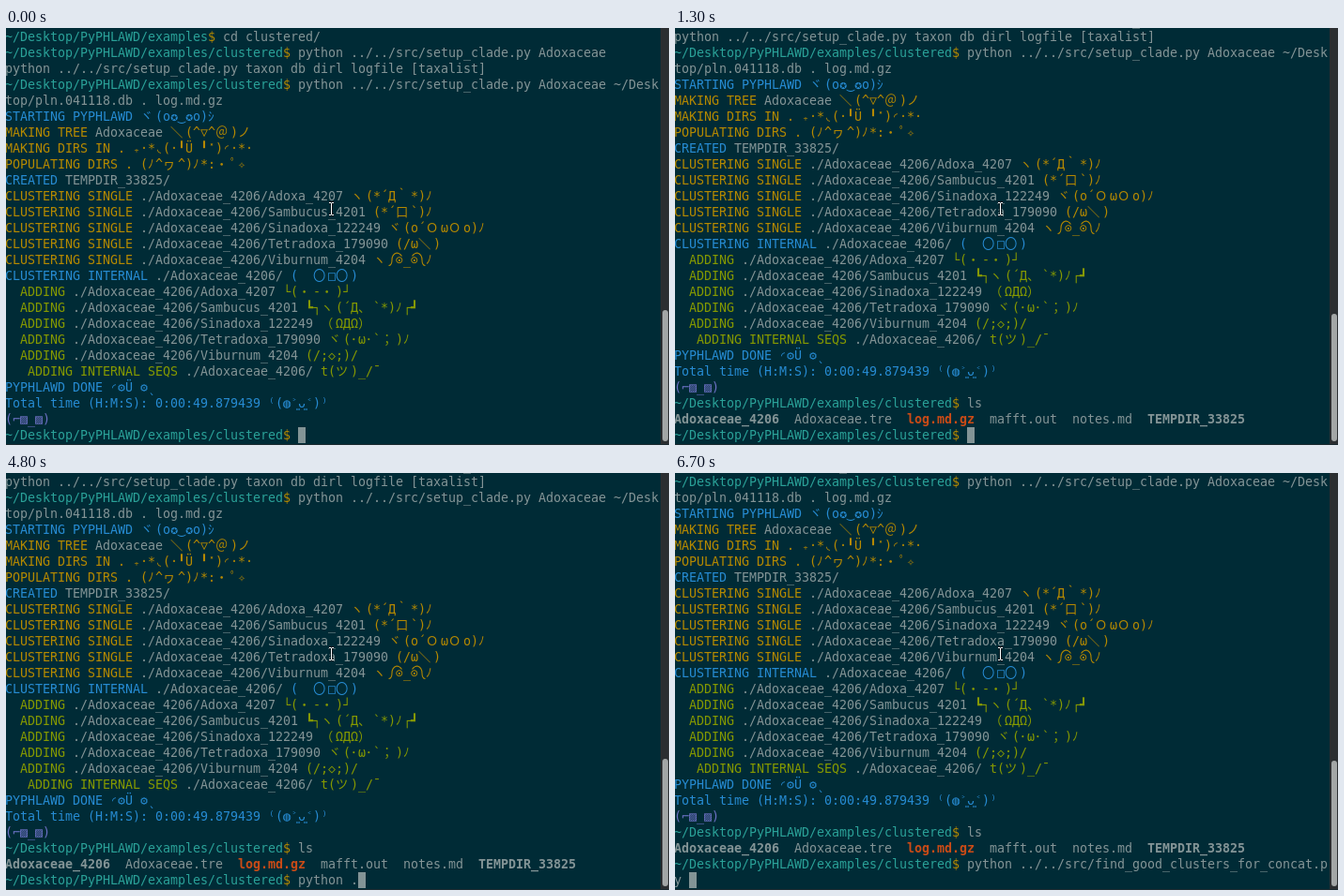
An HTML page that plays this animation: 706 px wide and 445 px high, repeating every 8 s.

```html
<!DOCTYPE html>
<html lang="en">
<head>
<meta charset="utf-8">
<title>Terminal session</title>
<style>
html, body { margin: 0; width: 100%; height: 100%; overflow: hidden; background: #002b36; }
svg { display: block; }
text {
  font: 13.333px "DejaVu Sans Mono", "Noto Sans Mono", "DejaVu Sans", "Noto Sans CJK JP", monospace;
  white-space: pre;
  fill: #839496;
}
.cyan { fill: #2aa198; }
.blue { fill: #268bd2; }
.yellow { fill: #b58900; }
.green { fill: #859900; }
.violet { fill: #6c71c4; }
.bold { font-weight: bold; }
.zip { font-weight: bold; fill: #cb4b16; }
</style>
</head>
<body>
<svg width="706" height="445" viewBox="0 0 706 445">
  <rect width="706" height="445" fill="#002b36"/>
  <g id="screen">
    <g id="log"></g>
    <g id="after"></g>
    <g fill="none" stroke="#b58900" stroke-width="1.1">
      <path id="curl" d="M407.5 253.5q3.5 0 3.5-6t5-7.5q3 0 5.5 3.5"/>
      <use href="#curl" transform="translate(854 0) scale(-1 1)"/>
    </g>
    <rect id="cursor" width="8" height="17" fill="#839496"/>
    <g id="typed"></g>
  </g>
  <rect x="697" width="9" height="445" fill="#2b2e31"/>
  <rect y="444" width="706" height="1" fill="#1b2a30"/>
  <rect id="thumb" x="699" width="6" rx="3" fill="#a3a6a6"/>
  <g fill="none">
    <path d="M344 186.5h2l.5 1 .5-1h2M346.5 187v12M344 199.5h2l.5-1 .5 1h2" stroke="#001318" stroke-width="2.6"/>
    <path d="M344 186.5h2l.5 1 .5-1h2M346.5 187v12M344 199.5h2l.5-1 .5 1h2" stroke="#fff"/>
  </g>
</svg>
<script>
const NS = "http://www.w3.org/2000/svg";
const COLS = 87, CELL = 8, ROW = 17, LOOP = 8000;
const $ = id => document.getElementById(id);

const cellX = n => n % COLS * CELL - 1;
const cellY = (row, n) => (row + Math.floor(n / COLS)) * ROW + 1;

function cellsOf(ch) {
  const c = ch.codePointAt(0);
  if (c >= 0x300 && c < 0x370) return 0;
  return (c >= 0x3000 && c < 0xa000) || (c > 0xff00 && c < 0xff61) ? 2 : 1;
}

// Lays text on the cell grid; {name} switches the style, long lines wrap.
function put(parent, row, str, start = 0) {
  const text = document.createElementNS(NS, "text");
  let n = start, style = "";
  str.split(/\{(\w+)\}/).forEach((part, i) => {
    if (i % 2) { style = part; return; }
    if (!part) return;
    const span = document.createElementNS(NS, "tspan");
    const xs = [], ys = [];
    for (const ch of part) {
      const w = cellsOf(ch), at = w ? n : n - 1;
      xs.push(cellX(at));
      ys.push(cellY(row, at) + 13);
      n += w;
    }
    span.setAttribute("x", xs.join(" "));
    span.setAttribute("y", ys.join(" "));
    span.setAttribute("class", style);
    span.textContent = part;
    text.appendChild(span);
  });
  parent.appendChild(text);
}

const home = "{cyan}~/Desktop/PyPHLAWD/examples";
const prompt = home + "/clustered{yellow}${plain} ";
const PROMPT = 39;
const setup = "python ../../src/setup_clade.py ";
const dir = "./Adoxaceae_4206/";
const single = (name, face) => `{yellow}CLUSTERING SINGLE {plain}${dir}${name} {yellow}${face}`;
const adding = (name, face) => `{green}  ADDING {plain}${dir}${name} {green}${face}`;

const rows = [
  home + "{yellow}${plain} cd clustered/",
  prompt + setup + "Adoxaceae",
  setup + "taxon db dirl logfile [taxalist]",
  prompt + setup + "Adoxaceae ~/Desktop/pln.041118.db . log.md.gz",
  "",
  "{blue}STARTING PYPHLAWD ヾ(o✪‿✪o)ｼ",
  "{yellow}MAKING TREE {plain}Adoxaceae {yellow}＼(^▽^＠)ノ",
  "{yellow}MAKING DIRS IN . ₊·*◟(·╹Ü ╹˟)◜·*·",
  "{yellow}POPULATING DIRS . (ﾉ^ヮ^)ﾉ*:・ﾟ✧",
  "{blue}CREATED {plain}TEMPDIR_33825/",
  single("Adoxa_4207", "ヽ(*´Д｀*)ﾉ"),
  single("Sambucus_4201", "(*´口`)ﾉ"),
  single("Sinadoxa_122249", "ヾ(o´ＯωＯo)ﾉ"),
  single("Tetradoxa_179090", "(/ω＼)"),
  single("Viburnum_4204", "ヽ ⊙_⊙ ﾉ"),
  `{blue}CLUSTERING INTERNAL {plain}${dir} {blue}(  〇□〇)`,
  adding("Adoxa_4207", "└(・-・)┘"),
  adding("Sambucus_4201", "┗┐ヽ(´Д、`*)ﾉ┌┛"),
  adding("Sinadoxa_122249", "（ΩДΩ）"),
  adding("Tetradoxa_179090", "ヾ(･ω･`；)ﾉ"),
  adding("Viburnum_4204", "(/;◇;)/"),
  `{green}   ADDING INTERNAL SEQS {plain}${dir} {green}t(ツ)_/¯`,
  "{blue}PYPHLAWD DONE ◜⚙Ü ⚙ˎ",
  "{blue}Total time (H:M:S): 0:00:49.879439 ⁽(◍˃ᴗ͈˂͈)⁾",
  "{violet}(⌐▨_▨)",
  prompt
];
rows.forEach((str, i) => put($("log"), i, str));
put($("after"), 25, "ls", PROMPT);
put($("after"), 26, "{bold}Adoxaceae_4206{plain}  Adoxaceae.tre  {zip}log.md.gz" +
  "{plain}  mafft.out  notes.md  {bold}TEMPDIR_33825");
put($("after"), 27, prompt);

const find = "python ../../src/find_good_clusters_for_concat.py ";
// [time, characters typed]
const lsKeys = [[700, 1], [1000, 2]];
const findKeys = [
  [3400, 1], [3700, 2], [3800, 3], [3900, 4], [4000, 5], [4100, 6], [4200, 7],
  [4800, 8], [5000, 9], [5100, 10], [5300, 11], [5500, 12], [5600, 13], [5700, 15],
  [6100, 17], [6500, 18], [6600, 20], [6700, find.length]
];
const typedAt = (keys, t) => keys.reduce((n, [at, count]) => t >= at ? count : n, 0);

let shown = "";
function draw(t) {
  const listed = t >= 1300, wrapped = t >= 6700;
  const row = listed ? 27 : 25;
  const str = listed ? find.slice(0, typedAt(findKeys, t)) : "ls".slice(0, typedAt(lsKeys, t));
  const key = row + str;
  if (key === shown) return;
  shown = key;

  const scroll = wrapped ? 3 : listed ? 2 : 0;
  const top = wrapped ? 307 : listed ? 305 : 301;
  const end = PROMPT + str.length;
  $("screen").setAttribute("transform", `translate(0 ${-scroll * ROW})`);
  $("after").setAttribute("display", listed ? "inline" : "none");
  $("typed").replaceChildren();
  put($("typed"), row, str, PROMPT);
  $("cursor").setAttribute("x", cellX(end));
  $("cursor").setAttribute("y", cellY(row, end));
  $("thumb").setAttribute("y", top);
  $("thumb").setAttribute("height", 441 - top);
}

function tick() {
  draw(performance.now() % LOOP);
  requestAnimationFrame(tick);
}
tick();
</script>
</body>
</html>
```
